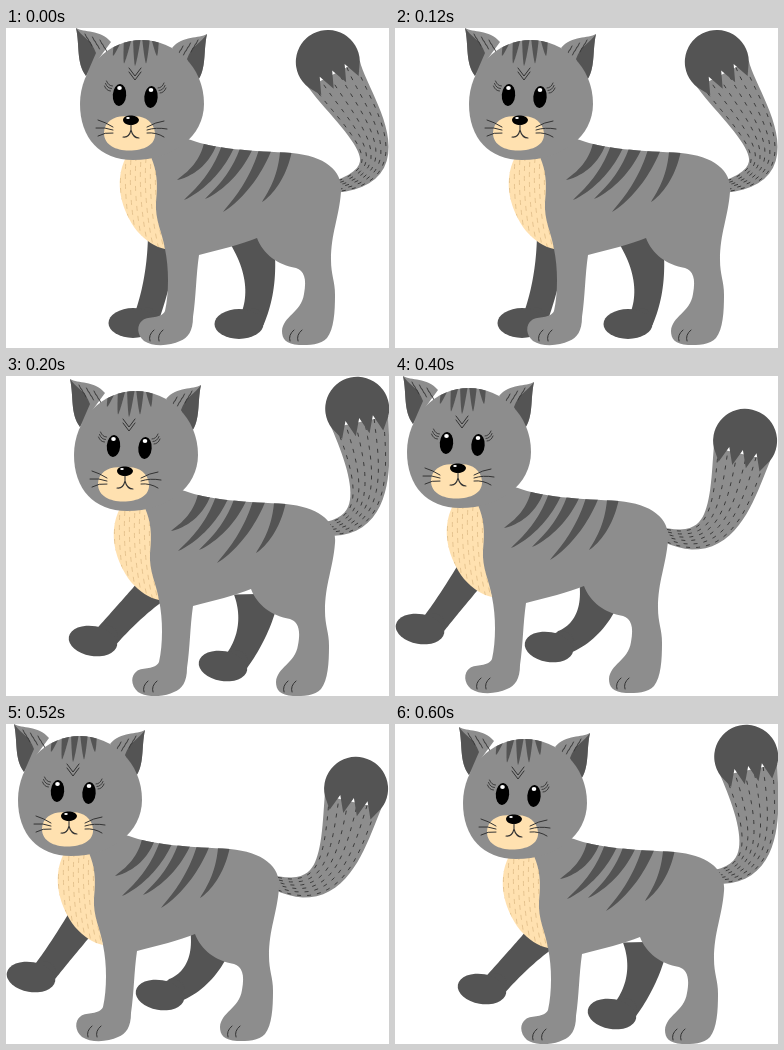
Write an HTML page that moves like this. It is 383 by 320 pixels and loops after 800 ms.

```html
<!DOCTYPE html>
<html lang="en">
<head>
<meta charset="utf-8">
<title>Walking cat</title>
<style>
html, body { margin: 0; width: 100%; height: 100%; overflow: hidden; background: #fff; }
svg { display: block; width: 100vw; height: 100vh; }
</style>
</head>
<body>
<svg id="stage" viewBox="0 0 383 320"></svg>
<script>
const GREY = '#8d8d8d', DARK = '#545454', CREAM = '#ffe1b0', TAN = '#e3c08c', INK = '#333';
const STEP = 200, ORDER = [0, 1, 2, 1];
const stage = document.getElementById('stage');

function add(parent, tag, attrs = {}) {
  const el = document.createElementNS('http://www.w3.org/2000/svg', tag);
  for (const k in attrs) el.setAttribute(k, attrs[k]);
  parent.appendChild(el);
  return el;
}
const shape = (parent, d, fill) => add(parent, 'path', { d, fill });
const line = (parent, d, stroke = INK, width = 1, extra = {}) =>
  add(parent, 'path', { d, stroke, 'stroke-width': width, fill: 'none', 'stroke-linecap': 'round', ...extra });
const dashed = (parent, d, stroke, dash, offset) =>
  line(parent, d, stroke, 0.9, { 'stroke-dasharray': dash, 'stroke-dashoffset': offset, 'stroke-linecap': 'butt' });
const oval = (parent, cx, cy, rx, ry, fill, turn = 0) =>
  add(parent, 'ellipse', { cx, cy, rx, ry, fill, transform: `rotate(${turn} ${cx} ${cy})` });

// Group whose content is cut to an outline
function clipped(parent, id, d) {
  add(add(add(stage, 'defs'), 'clipPath', { id }), 'path', { d });
  return add(parent, 'g', { 'clip-path': `url(#${id})` });
}

const mix = (a, b, t) => a.map((v, k) => v + (b[k] - v) * t);
function bezier(pts, t) {
  while (pts.length > 1) pts = pts.slice(1).map((p, i) => mix(pts[i], p, t));
  return pts[0];
}
// Position, direction and normal on a curve
function onCurve(pts, t) {
  const a = bezier(pts, t - 0.002), b = bezier(pts, t + 0.002);
  const dx = b[0] - a[0], dy = b[1] - a[1], n = Math.hypot(dx, dy);
  return { p: bezier(pts, t), dir: [dx / n, dy / n], side: [dy / n, -dx / n] };
}
function moved({ p, dir, side }, across, along = 0) {
  return p.map((v, k) => v + side[k] * across + dir[k] * along);
}
// Points beside a curve; side runs from -1 to 1
function edge(pts, width, side) {
  return Array.from({ length: 25 }, (_, i) => moved(onCurve(pts, i / 24), side * width(i / 24) / 2));
}
function ribbon(parent, pts, width, fill) {
  shape(parent, 'M' + [...edge(pts, width, -1), ...edge(pts, width, 1).reverse()].join('L') + 'Z', fill);
}

// Each leg: hip, knee, ankle
const poses = [
  { shift: [0, 0], tilt: 0,
    front: [[158, 205], [154, 252], [140, 291]],
    hind: [[244, 205], [262, 255], [246, 292]],
    tail: [[328, 46], [347, 83], [406, 143], [329, 159]] },
  { shift: [-6, 3], tilt: 10,
    front: [[148, 212], [126, 232], [100, 261]],
    hind: [[251, 218], [252, 256], [230, 286]],
    tail: [[354, 46], [362, 84], [380, 155], [312, 153]] },
  { shift: [-62, 0], tilt: 10,
    front: [[78, 195], [52, 231], [38, 249]],
    hind: [[207, 210], [200, 254], [167, 267]],
    tail: [[347, 78], [336, 125], [327, 183], [262, 156]] }
];

function drawLeg(g, pts, hip, tilt) {
  const [x, y] = pts[2];
  ribbon(g, pts, t => 25 + (hip - 25) * (1 - t) ** 2, DARK);
  oval(g, x, y, 12, 12, DARK);
  oval(g, x - 13, y + 4, 24.5, 15, DARK, tilt);
}

function drawTail(g, pts) {
  const width = t => 58 - 46 * t, rows = 6, teeth = 4;
  ribbon(g, pts, width, GREY);
  for (let i = 0; i < rows; i++) {
    const row = edge(pts, width, (2 * i + 1) / rows - 1);
    dashed(g, 'M' + row.join('L'), INK, '4 6', i * 5);
  }
  const root = onCurve(pts, 0), zigzag = [];
  for (let i = 1; i < teeth * 2; i++) zigzag.push(moved(root, 28 * (1 - i / teeth), i % 2 ? 13 : -4));
  shape(g, `M${moved(root, -29)}A32 32 0 1 1 ${moved(root, 29)}L${zigzag.join('L')}Z`, DARK);
}

function drawBack(pose) {
  const g = add(stage, 'g');
  drawTail(g, pose.tail);
  drawLeg(g, pose.front, 32, pose.tilt);
  drawLeg(g, pose.hind, 46, pose.tilt);
  return g;
}

const BODY = 'M140 100L185 112C207 121 248 123 286 125C318 128 337 142 335 164C333 190 325 205 325 232' +
  'C325 247 329 253 329 267C329 284 328 301 321 310C315 317 303 317 293 317C280 316 276 311 276 303' +
  'C277 288 295 285 298 266C301 250 298 243 290 240C272 237 257 226 251 210C236 216 213 222 193 227' +
  'C190 247 190 270 187 289C187 303 182 310 174 313C164 318 147 319 138 313C131 307 130 297 137 292' +
  'C143 288 155 291 159 283C163 265 163 240 159 221L135 140Z';
const CHEST = 'M120 129C107 155 116 183 131 203C140 213 149 219 159 221C156 203 149 193 150 174C152 155 151 143 145 129Z';
const HEAD = 'M136 12C168 12 198 38 198 76C198 108 168 132 127 132C94 132 74 110 74 76C74 40 102 12 136 12Z';

function drawBody(g) {
  shape(g, BODY, GREY);
  shape(g, CHEST, CREAM);
  const fur = clipped(g, 'chest', CHEST);
  for (let x = 115, i = 0; i < 8; x += 5, i++) dashed(fur, `M${x} 130Q${x - 3} 175 ${x + 8} 222`, TAN, '5 5', i * 4);

  const coat = clipped(g, 'body', BODY);
  [[171, 152], [178, 172], [199, 171], [217, 184], [256, 174]].forEach((tip, i) => {
    const top = [205 + 19 * i, 113], mid = mix(top, tip, 0.5);
    ribbon(coat, [top, [mid[0] + 10, mid[1] + 7], tip], t => 13 * (1 - t) ** 0.7, DARK);
  });
  for (const x of [148, 157, 288, 296]) line(g, `M${x} 302q-6 5 -4 11`);
}

function drawEar(head, transform) {
  const g = add(head, 'g', { transform });
  shape(g, 'M70 0C78 5 94 1 105 14L80 48C70 34 74 18 70 0Z', GREY);
  shape(g, 'M70 0C76 9 85 11 90 25L80 48C70 34 74 18 70 0Z', DARK);
  for (let i = 0; i < 9; i++) line(g, `M${79 + 2.5 * i} ${6 + i + i % 3 * 3}l2 4`, INK, 0.9);
}

function drawHead(g) {
  drawEar(g, '');
  drawEar(g, 'translate(271 6) scale(-1 1)');
  shape(g, HEAD, GREY);

  const brow = clipped(g, 'head', HEAD);
  for (let i = -2; i <= 2; i++) {
    const top = [131 + 9 * i, 9], tip = [129 + 11 * i, 38 - 2.5 * i * i];
    ribbon(brow, [top, mix(top, tip, 0.5), tip], t => 8 * (1 - t) ** 0.7, DARK);
  }
  for (const y of [40, 44]) line(g, `M123 ${y}l6 8l6 -8`);

  for (const [x, y, out] of [[113.5, 67, -1], [145, 69, 1]]) {
    oval(g, x, y, 6.7, 11, '#000', 4);
    oval(g, x, y - 7, 2.3, 2, '#fff');
    for (let i = 0; i < 3; i++) line(g, `M${x + out * (7 + i)} ${y - 9 + 2.5 * i}q${out * 4} 0 ${out * 6} -5`, INK, 0.9);
  }

  shape(g, 'M124 89C112 86 98 92 98 105C98 117 110 122.5 123 122.5C138 122.5 150 117 149 105C148 93 136 86 124 89Z', CREAM);
  shape(g, 'M117 91.5C118 86 131 86 133 91.5C133 95.5 128 97 125 97C121 97 117 95.5 117 91.5Z', '#000');
  oval(g, 122, 90, 1.8, 1.1, '#fff');
  line(g, 'M125 97V102Q123 110 117 109M125 102Q127 110 133 110', INK, 1.1);
  for (let i = -1; i <= 1; i++) {
    const y = 102 + 3 * i;
    line(g, `M107 ${y}q-8 ${2 * i - 3} ${-17 + 2 * i * i} ${5 * i - 2}`);
    line(g, `M141 ${y}q9 ${2 * i - 3} ${20 - 3 * i * i} ${5 * i - 1}`);
  }
}

const backs = poses.map(drawBack);
const cat = add(stage, 'g');
drawBody(cat);
drawHead(cat);

const start = performance.now();
function frame() {
  const t = Math.max(0, performance.now() - start);
  const now = ORDER[Math.floor(t / STEP) % ORDER.length];
  backs.forEach((g, i) => g.setAttribute('display', i === now ? 'inline' : 'none'));
  cat.setAttribute('transform', `translate(${poses[now].shift})`);
  requestAnimationFrame(frame);
}
frame();
</script>
</body>
</html>
```
